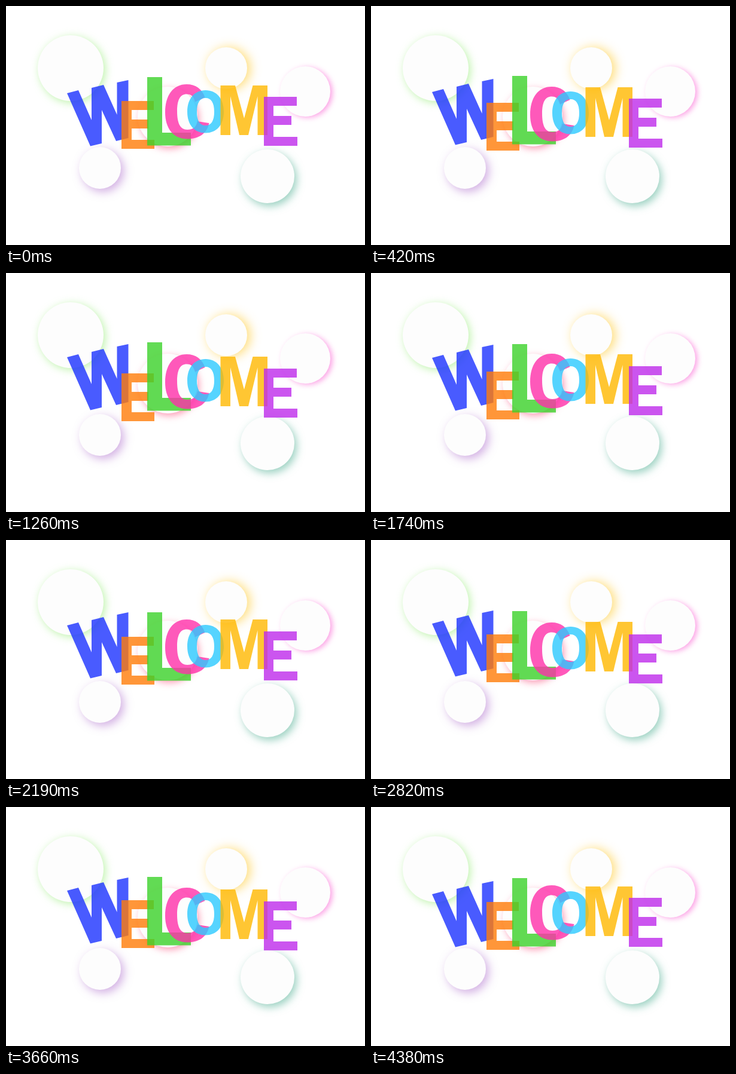
An HTML page for the animation above (4470 ms loop, 600 by 400 pixels).

```html
<!DOCTYPE html>
<html lang="en">
<head>
<meta charset="utf-8">
<title>Welcome</title>
<style>
  html, body { margin: 0; width: 100%; height: 100%; overflow: hidden; background: #fff; }
  #stage { position: relative; width: 600px; height: 400px; overflow: hidden; }
  .disc { position: absolute; border-radius: 50%; background: #fdfdfd; }
  svg { position: absolute; left: 0; top: 0; }
</style>
</head>
<body>
<div id="stage">
  <svg width="600" height="400" viewBox="0 0 600 400" role="img" aria-label="WELCOME"></svg>
</div>
<script>
const LOOP = 4470, STEP = 30, START = 30, END = 4350, MID = 2190;
const stage = document.getElementById('stage');
const svg = stage.querySelector('svg');

// centre x, centre y, radius, shadow
const discs = [
  [108, 104, 55, '3px 3px 14px rgba(150,235,120,.62)'],
  [368, 104, 35, '5px 1px 18px rgba(255,205,60,.72)'],
  [500, 143, 42, '4px 2px 9px rgba(250,110,215,.62)'],
  [157, 271, 35, '5px 5px 15px rgba(165,95,200,.5)'],
  [437, 285, 45, '4px 5px 14px rgba(60,165,135,.52)'],
  [270, 185, 50, '3px 4px 12px rgba(250,80,125,.55)']
];
for (const [x, y, r, shadow] of discs) {
  const d = document.createElement('div');
  d.className = 'disc';
  d.style.cssText = `left:${x - r}px;top:${y - r}px;width:${2 * r}px;height:${2 * r}px;box-shadow:${shadow}`;
  stage.insertBefore(d, svg);
}

const letterE = (x, y, w, h, stem, bar, mid) =>
  `M${x} ${y}h${w - 1}v${bar}h${stem + 1 - w}v${mid}h${w - 10 - stem}v${bar}` +
  `h${stem + 10 - w}V${y + h - bar}h${w - stem}v${bar}h${-w}z`;

// colour, outline, [time, offset] turning points
const letters = [
  ['#1c33ff',
    'M102 146L121 141L143 191V137L163 132L185.500 182V128L204.500 124V221L184 226L160 174V230L141 234.500Z',
    [[START, 0], [1035, -6], [MID, -3], [3285, -9], [4422, 0]]],
  ['#ff7c08', letterE(193, 159, 55, 80, 17, 15, 16),
    [[START, 0], [1240, 9], [MID, 3], [3300, -4.3], [END, 0]]],
  ['#3bd22a', 'M236 119H261V212H309V233.500H236Z',
    [[START, 0], [1035, -4], [MID, 2], [3400, -2.6], [END, 0]]],
  ['#ff31aa',
    'M332.500 153C328 139 317 131 302 131C279 131 266 150 266 178C266 204 279 222.500 303 222.500' +
    'C323 222.500 336 213 339.500 196L320 193C318 203 312 207 303 207C291 207 286 196 286 176' +
    'C286 157 291 147.500 302 147.500C310 147.500 314 152 316 160.500Z',
    [[START, 0], [780, 7], [MID, 2], [2960, 8], [END, 0]]],
  ['#2ccaff',
    'M333.500 141C315 141 303 155 303 177S315 212.500 333.500 212.500S364 199 364 177S352 141 333.500 141Z' +
    'M333.500 154C343 154 348 162 348 177S343 200 333.500 200S319 192 319 177S324 154 333.500 154Z',
    [[START, 0], [780, 4.7], [MID, 1], [2900, 4.2], [END, 0]]],
  ['#ffb800', 'M358.500 133H383L398 188L412.500 133H437V216H420.500V151L405 216H390L375 151V216H358.500Z',
    [[START, 0], [1090, 8], [MID, 0], [3285, 7.5], [END, 0]]],
  ['#be2bec', letterE(431, 152, 56, 82, 16, 15, 17),
    [[START, 0], [1100, 9], [MID, 1], [3285, 9.5], [END, 0]]]
].map(([color, d, track]) => {
  const el = document.createElementNS('http://www.w3.org/2000/svg', 'path');
  el.setAttribute('d', d);
  el.setAttribute('fill', color);
  el.setAttribute('fill-rule', 'evenodd');
  el.setAttribute('fill-opacity', '.8');
  svg.append(el);
  return { el, track };
});

function offset(track, t) {
  if (t <= track[0][0]) return track[0][1];
  for (let i = 1; i < track.length; i++) {
    const [t0, a] = track[i - 1], [t1, b] = track[i];
    if (t < t1) return a + (b - a) * (t - t0) / (t1 - t0);
  }
  return track[track.length - 1][1];
}

function draw(now) {
  const t = Math.floor((now % LOOP) / STEP) * STEP;
  for (const { el, track } of letters)
    el.setAttribute('transform', `translate(0 ${Math.round(offset(track, t))})`);
}

const begin = performance.now();
function tick() {
  draw(performance.now() - begin);
  requestAnimationFrame(tick);
}
tick();
</script>
</body>
</html>
```
